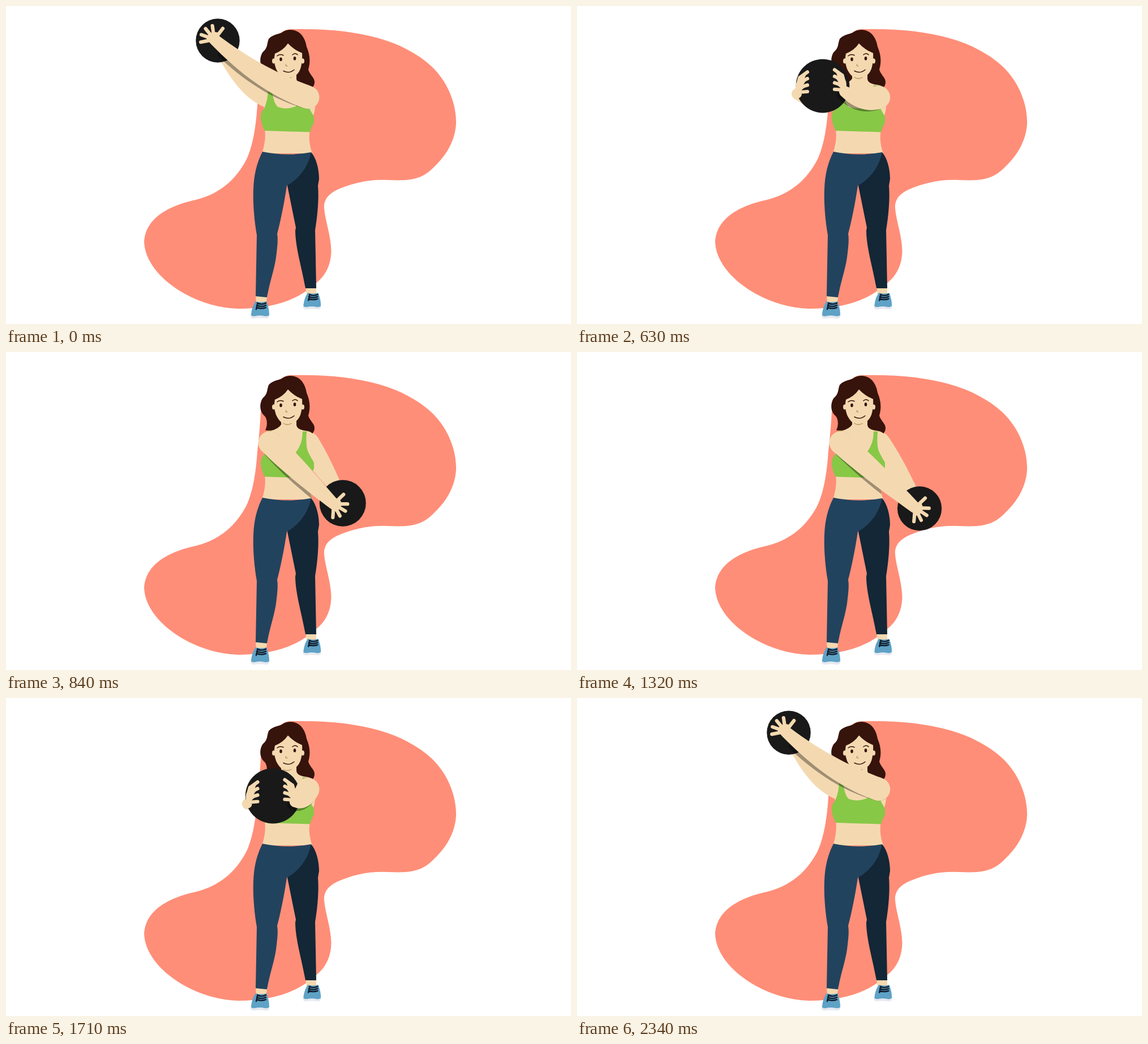
An HTML page that plays this animation: 998 by 561 pixels, repeating every 2.4 s.

```html
<!DOCTYPE html>
<html lang="en">
<head>
<meta charset="utf-8">
<title>Medicine ball swing</title>
<style>
  html, body { margin: 0; width: 100%; height: 100%; overflow: hidden; background: #fff; }
  svg { display: block; width: 100%; height: 100%; }
  .skin { fill: #f4d9b0; }
  .hair { fill: #36130b; }
  .navy { fill: #22435e; }
  .dark { fill: #132736; }
  .line { fill: none; stroke: #36130b; stroke-width: 1.5; stroke-linecap: round; }
  .tan { stroke: #b98d5a; stroke-width: 1.3; }
  .hand { fill: #f4d9b0; stroke: #f4d9b0; stroke-width: 6.2; stroke-linecap: round; stroke-linejoin: round; }
</style>
</head>
<body>
<svg viewBox="0 0 998 561">
  <defs>
    <g id="shoe">
      <path fill="#e6e9f0" d="M.5 22Q-2 32 6 31.500Q16 29.500 27 31.500Q35 32 33 22Z"/>
      <path fill="#5ea2c6" d="M9 1Q18 4 28 1Q33 13 33 25Q31 28 25 27Q16 25 8 27Q1 28 1 24Q2 11 9 1Z"/>
      <path fill="none" stroke="#132030" stroke-width="2.6" stroke-linecap="round"
        d="M12 4Q19 8 27 4M11 8Q19 12 27 8M11 12Q19 15 27 12M12 6L10 15"/>
    </g>
    <clipPath id="body"><use href="#torso"/><use href="#farArm"/></clipPath>
  </defs>

  <path fill="#ff8e78" d="M502 41C620 38 700 60 750 105C785 137 796 180 795 208C793 240 776 265 757 283C733 309 708 308 675 307C640 305 612 313 590 322C568 331 561 343 562 357C564 380 574 405 574.500 432C574 460 562 477 550 487C515 520 470 534 410 534C330 532 245 475 244 415C247 375 285 353 335 342C385 330 412 297 426 268C438 240 442 205 444 175C447 150 449 125 450 105C462 75 478 42 502 41Z"/>
  <path id="farArm" class="skin"/>

  <!-- hair, torso and top -->
  <path class="hair" d="M502 42C518 42 528 54 531 72C537 86 538 98 534 112C536 121 545 126 545 134Q545 140 541 144L513 138L486 134Q475 140 458 138C462 130 462 119 457 113C448 106 447 92 453 82C463 73 460 69 464 58C472 49 484 50 490 45Q495 42 502 42Z"/>
  <path id="torso" class="skin" d="M486 115V128Q482 135 468 139Q453 142 451 157Q455 172 456 182L457 218Q460 236 452 260H541Q533 238 537 218L545 185Q549 165 545 149Q541 140 530 139Q513 137 513 128V115Z"/>
  <path fill="#87c846" d="M463 139Q464 163 456 181Q449 188 450 199Q452 212 457 220L537 222.500Q540 212 544 206V195Q539 187 534 177Q529 168 531 140H524Q524 162 512 177Q495 184 480 178Q471 170 469 139Z"/>

  <!-- legs -->
  <path class="skin" d="M441 509H462L459 526H442ZM529 495H548V510H531Z"/>
  <path class="dark" d="M539 258C548 268 553 288 553 305L551 317C553 340 550 370 547 389L546 395L548 498H529C522 460 511 425 511 396L512 391L497 317L510 280Z"/>
  <path class="navy" d="M453 257Q497 266 539 258C533 286 517 305 496 317C492 345 485 380 479 402Q481 412 478 435C476 460 466 485 461 514L441 512L443 404C438 375 436 345 437 323Q438 286 453 257Z"/>
  <use href="#shoe" x="432" y="520"/>
  <use href="#shoe" transform="translate(524.500 505) scale(.96)"/>

  <!-- face -->
  <g class="skin">
    <ellipse cx="473" cy="97" rx="3" ry="4.500"/><ellipse cx="524" cy="97" rx="3" ry="4.500"/>
    <path d="M498 66Q490 78 475 84Q472 98 477 111Q485 128 498 129Q514 126 520 111Q524 98 523 83Q508 77 498 66Z"/>
  </g>
  <ellipse class="hair" cx="485.500" cy="94" rx="2.300" ry="3.300"/>
  <ellipse class="hair" cx="510" cy="92.500" rx="2.300" ry="3.300"/>
  <path class="line" d="M479 88Q484 84 490 87M506 86Q511 82 515 86M490 114.500Q500 120 509 112.500"/>
  <path class="line tan" d="M495 103Q492 106 497 106M490 126Q497 130 504 126"/>

  <circle id="ball" fill="#191919"/>
  <path id="farHand" class="hand"/>
  <path id="shadow" fill-opacity=".35" clip-path="url(#body)"/>
  <path id="nearArm" class="skin"/>
  <path id="nearHand" class="hand"/>
</svg>

<script>
const point = (x, y) => ({ x, y });
const add = (a, b) => point(a.x + b.x, a.y + b.y);
const mix = (a, b, f) => point(a.x + (b.x - a.x) * f, a.y + (b.y - a.y) * f);
const xy = p => `${p.x.toFixed(2)} ${p.y.toFixed(2)}`;

const leftShoulder = point(466, 160), rightShoulder = point(533, 161);
const shade = point(-4, 5);

// The near arm reaches across the chest; sign mirrors the hands between the two ends.
const highLeft = { near: rightShoulder, far: leftShoulder, sign: 1, aim: 4.03, gripSpan: .12 };
const lowRight = { near: leftShoulder, far: rightShoulder, sign: -1, aim: .58, gripSpan: .25 };

// Tapered tube along a quadratic curve, with round ends.
function limb(from, bend, to) {
  const steps = 16, lower = [], upper = [];
  for (let i = 0; i <= steps; i++) {
    const s = i / steps;
    const a = mix(from, bend, s), b = mix(bend, to, s), c = mix(a, b, s);
    const r = 10 + 10.5 * Math.cos(s * Math.PI / 2);
    const k = r / (Math.hypot(b.x - a.x, b.y - a.y) || 1);
    const side = point((a.y - b.y) * k, (b.x - a.x) * k);
    lower.push(xy(add(c, side)));
    upper.unshift(xy(add(c, point(-side.x, -side.y))));
  }
  return `M${lower.join("L")}A10 10 0 0 0 ${upper.join("L")}A20.5 20.5 0 0 0 ${lower[0]}Z`;
}

// Fingers blend from an open fan to a row wrapped round the ball.
function hand(palm, sign, aim, curl) {
  const r = 5;
  let fingers = "", knuckles = "";
  for (let i = 0; i < 5; i++) {
    const thumb = i === 4;
    const angle = aim + sign * (.54 * (i - 2) + (thumb ? .26 : 0));
    const open = point(24.5 * Math.cos(angle), 24.5 * Math.sin(angle));
    const wrapped = thumb ? point(-sign, -18) : point(-18 * sign, -4 - 11.5 * i);
    const tip = mix(open, wrapped, curl);
    const knuckle = add(palm, point(tip.x * (.45 - .2 * curl), tip.y * (.45 + .3 * curl)));
    fingers += `M${xy(palm)}L${xy(knuckle)}L${xy(add(palm, tip))}`;
    knuckles += `L${xy(knuckle)}`;
  }
  const base = `M${palm.x - r} ${palm.y}a${r} ${r} 0 1 0 ${2 * r} 0a${r} ${r} 0 1 0 ${-2 * r} 0`;
  return `${base}M${xy(palm)}${knuckles}Z${fingers}`;
}

const sigmoid = x => 1 / (1 + Math.exp(-x));
const swing = t => t < 1185 ? sigmoid((t - 676) / 65.3) : 1 - sigmoid((t - 1699.5) / 88);

function ballAt(u) {
  const a = point(374, 61), b = point(396, 138), c = point(560, 230), d = point(607, 278);
  const m = mix(b, c, u);
  return mix(mix(mix(a, b, u), m, u), mix(m, mix(c, d, u), u), u);
}

const el = id => document.getElementById(id);
const set = (id, name, value) => el(id).setAttribute(name, value);

function draw(now) {
  const u = swing(now % 2400);
  const { near, far, sign, aim, gripSpan } = u < .52 ? highLeft : lowRight;
  const grip = Math.min(1, Math.min(u, 1 - u) / gripSpan);
  const curl = grip ** 3;
  const ball = ballAt(u);
  const nearPalm = add(ball, mix(point(-6, -2), point(39 * sign, 10), grip));
  const farPalm = add(ball, mix(point(10 * sign, 24 * sign), point(-45 * sign, 14), curl));
  const bend = (from, to) => add(mix(from, to, .5), point(0, 22 * (1 - u)));
  const elbow = bend(near, nearPalm);

  set("ball", "cx", ball.x);
  set("ball", "cy", ball.y);
  set("ball", "r", 38.7 + 10 * Math.sin(Math.PI * u));
  set("farArm", "d", limb(far, bend(far, farPalm), farPalm));
  set("farHand", "d", grip === 1 ? hand(farPalm, -sign, aim, 1) : "");
  set("shadow", "d", limb(near, add(elbow, shade), add(nearPalm, shade)));
  set("nearArm", "d", limb(near, elbow, nearPalm));
  set("nearHand", "d", hand(nearPalm, sign, aim, curl));
}

const start = performance.now();
function tick() {
  draw(performance.now() - start);
  requestAnimationFrame(tick);
}
tick();
</script>
</body>
</html>
```
